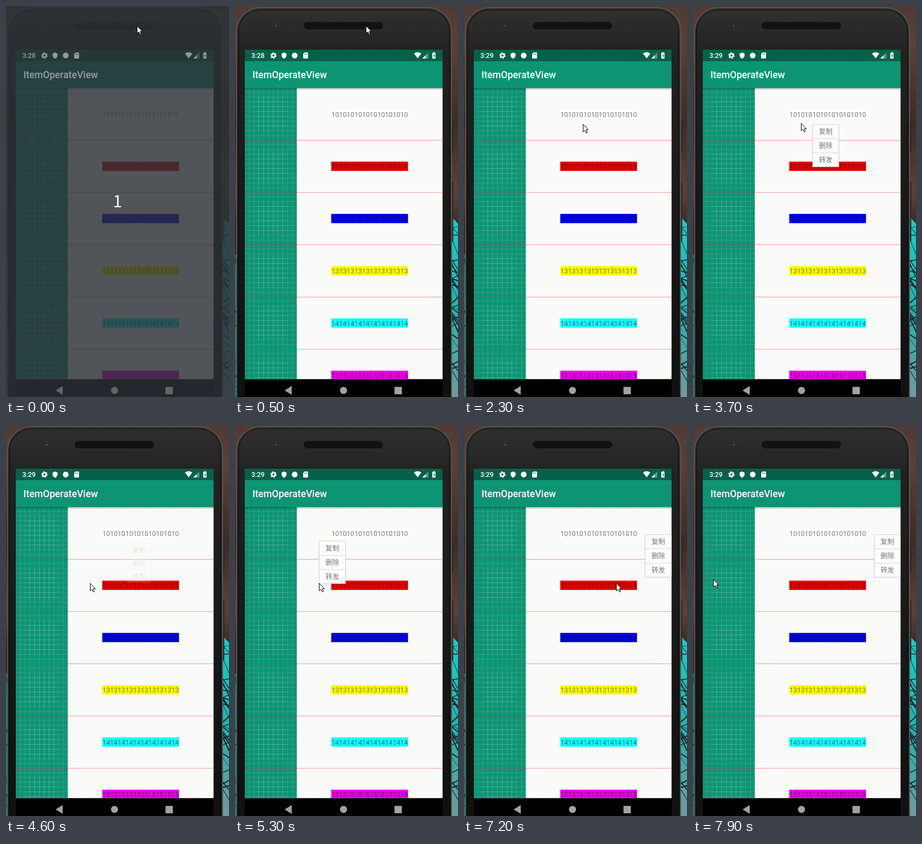
These frames come from a looping animation (409x715 px, 8000 ms). An HTML page:

```html
<!DOCTYPE html>
<html lang="en">
<head>
<meta charset="utf-8">
<title>ItemOperateView</title>
<style>
  html, body { margin: 0; width: 100%; height: 100%; overflow: hidden; background: #000; }
  svg { display: block; width: 100%; height: 100%; }
  text { font-family: Roboto, sans-serif; }
  .cjk { font-family: "Noto Sans CJK SC", "Noto Sans CJK", sans-serif; }
  .mid { text-anchor: middle; }
</style>
</head>
<body>
<svg viewBox="0 0 409 715">
  <defs>
    <linearGradient id="wall" x2="0" y2="1">
      <stop offset="0" stop-color="#4f3a34"/>
      <stop offset=".1" stop-color="#5a4037"/>
      <stop offset=".3" stop-color="#3f2b26"/>
      <stop offset=".48" stop-color="#5c4138"/>
      <stop offset=".56" stop-color="#3a2823"/>
    </linearGradient>
    <linearGradient id="neon" x2="0" y2="1">
      <stop offset="0" stop-color="#17cfc6"/>
      <stop offset=".5" stop-color="#1fb5b0"/>
      <stop offset="1" stop-color="#6f9a9c"/>
    </linearGradient>
    <linearGradient id="face" x2="0" y2="1">
      <stop offset="0" stop-color="#30302e"/>
      <stop offset=".11" stop-color="#222220"/>
      <stop offset=".5" stop-color="#191918"/>
      <stop offset="1" stop-color="#0f0f0f"/>
    </linearGradient>
    <linearGradient id="barShadow" x2="0" y2="1">
      <stop offset="0" stop-opacity=".3"/>
      <stop offset="1" stop-opacity="0"/>
    </linearGradient>
    <pattern id="mesh" width="3" height="3" patternUnits="userSpaceOnUse">
      <rect width="3" height="3" fill="#0c0c0c"/>
      <circle cx="1.5" cy="1.5" r=".8" fill="#292927"/>
    </pattern>
    <clipPath id="screen"><rect x="18" y="80" width="362.700" height="602.600"/></clipPath>
    <g id="grid" fill="none" stroke="#fff" stroke-opacity=".2" stroke-width=".8"></g>
  </defs>

  <!-- Wallpaper -->
  <rect width="409" height="715" fill="url(#wall)"/>
  <path d="M395 383L409 398V715H395Z" fill="url(#neon)"/>
  <path d="M0 455H6V715H0Z" fill="#14807c"/>
  <g id="wires" fill="none" stroke="#0b2a2c"></g>

  <!-- Phone -->
  <path d="M398 212h2v55h-2zM398 322h2v108h-2z" fill="#3b3b3a" stroke="#111" stroke-width=".6"/>
  <rect x="3" y="3" width="394" height="780" rx="43" fill="url(#face)" stroke="#565653" stroke-width="2"/>
  <rect x="6.500" y="7" width="387" height="780" rx="39.500" fill="none" stroke="#111" stroke-width="1.500" opacity=".7"/>
  <rect x="126.500" y="30" width="144.500" height="12" rx="6" fill="url(#mesh)" stroke="#0a0a0a"/>
  <circle cx="75" cy="36" r="5.500" fill="#24262a" stroke="#3a3a39"/>
  <circle cx="75" cy="36" r="2.500" fill="#3a4352"/>

  <!-- Screen -->
  <g clip-path="url(#screen)">
    <rect x="18" y="150" width="363" height="533" fill="#fafaf8"/>
    <rect x="18" y="150" width="95.360" height="533" fill="#0d9473"/>
    <g id="rows"></g>
    <rect x="18" y="80" width="363" height="21" fill="#07614a"/>
    <rect x="18" y="101" width="363" height="49" fill="#0d9473"/>
    <rect x="18" y="150" width="363" height="4" fill="url(#barShadow)"/>
  </g>
  <rect x="18" y="682.600" width="363" height="33"/>

  <g id="dim">
    <rect width="409" height="715" fill="#2d3035" opacity=".82"/>
    <text class="cjk mid" x="204.500" y="368" font-size="30" fill="#fff">1</text>
  </g>

  <g id="labels" fill="#fff">
    <text id="clock" x="30" y="95" font-size="12.400" font-weight="500"></text>
    <text x="32" y="132" font-size="17.660" font-weight="500">ItemOperateView</text>
    <circle cx="70.500" cy="90.500" r="3.200" fill="none" stroke="#fff" stroke-width="2.600"/>
    <circle cx="70.500" cy="90.500" r="4.900" fill="none" stroke="#fff" stroke-width="1.800" stroke-dasharray="2.600 2.530"/>
    <path d="M90 85l4.500 2v3.200q0 4-4.500 6.300q-4.500-2.300-4.500-6.300V87Z"/>
    <circle cx="109.500" cy="90.500" r="5.200"/>
    <path d="M127.500 85h5.500q1 0 1 1v9q0 1-1 1h-7q-1 0-1-1v-7.500Z"/>
    <path d="M127.800 87v2M129.800 87v2M131.800 87v2" stroke="#07614a"/>
    <path d="M328.300 87q6.700-4.800 13.400 0L335 95.800Z"/>
    <path d="M354.500 85v11h-11Z" opacity=".35"/>
    <path d="M349.500 90v6h-6Z"/>
    <path d="M363 85.500h1v-1h2.500v1h1.200v10.800h-5.900V85.500Z"/>
    <path d="M365.500 87.500l-2 3.800h1.400v3l2-3.900h-1.400Z" fill="#07614a"/>
    <g fill="#a2a2a2">
      <path d="M91 703l13-8v16Z"/>
      <circle cx="199" cy="703" r="6.500"/>
      <rect x="292.500" y="696.500" width="13.500" height="13.500" rx="1"/>
    </g>
  </g>

  <g id="menu">
    <rect x="-1" y="1" width="51" height="79" rx="1" opacity=".05"/>
    <rect x=".5" y=".5" width="48" height="77.500" fill="#fdfdfd" stroke="#d9d9d9"/>
    <path d="M0 26.500H49M0 52.500H49" stroke="#d9d9d9"/>
    <g class="mid" font-size="12.400" fill="#757575">
      <text class="cjk" x="24.500" y="18">复制</text>
      <text class="cjk" x="24.500" y="44">删除</text>
      <text class="cjk" x="24.500" y="70">转发</text>
    </g>
  </g>

  <path id="cursor" d="M.5 .5V14.200L3.700 11.300L6 16.300L8.200 15.300L6 10.400H10Z" fill="#fff" stroke="#000" stroke-linejoin="round"/>
</svg>
<script>
const $ = id => document.getElementById(id);
const LOOP = 8000, STEP = 100, ROW_TOP = 149.7, ROW_HEIGHT = 95.55;

// Launcher-style grid on a 108 unit square, with a denser inner square
function buildGrid() {
  let d = "";
  for (let p = 9; p <= 99; p += 10) d += `M${p} 0V108M0 ${p}H108`;
  for (let p = 29; p <= 79; p += 10) d += `M${p} 19V89M19 ${p}H89`;
  $("grid").innerHTML = d.split(/(?=M)/).map(line => `<path d="${line}"/>`).join("");
}

function buildRows() {
  const fills = ["#fff", "#e00000", "#0000e6", "#ff0", "#1ff", "#e800e8"];
  $("rows").innerHTML = fills.map((fill, i) => {
    const top = ROW_TOP + i * ROW_HEIGHT, mid = top + ROW_HEIGHT / 2;
    return `<use href="#grid" transform="translate(18 ${top}) scale(.883)"/>
      <rect x="176.500" y="${mid - 8.4}" width="140.800" height="17" fill="${fill}"/>
      <text class="mid" x="247" y="${mid + 5.2}" font-size="12.500" fill-opacity=".52">${String(10 + i).repeat(10)}</text>
      <path d="M18 ${top + ROW_HEIGHT + .3}H381" stroke="#d2304c" stroke-opacity=".48"/>`;
  }).join("");
}

function buildWires() {
  let seed = 7;
  const rand = () => (seed = seed * 16807 % 2147483647) / 2147483647;
  let out = "";
  for (let i = 0; i < 44; i++) {
    const left = i % 4 === 0, x = left ? 0 : 397, y = (left ? 460 : 402) + rand() * 290;
    out += `<path d="M${x} ${y}l${left ? 5 : 13} ${rand() * 44 - 12}" stroke-width="${.6 + rand() * 1.8}"/>`;
  }
  $("wires").innerHTML = out;
}

// Pointer path: time, x, y
const pointerPath = [
  [0, 240, 36], [800, 240, 36], [1300, 246, 86], [1400, 246, 86], [1900, 218, 216],
  [3300, 218, 216], [3500, 204, 220], [3600, 204, 220], [3700, 198, 214], [4000, 174, 180],
  [4400, 154, 289], [5600, 154, 289], [5900, 238, 318], [6200, 337, 277], [6500, 337, 277],
  [6700, 328, 285], [6800, 328, 285], [6900, 324, 286], [7100, 324, 286], [7400, 190, 296],
  [7700, 50, 291], [7800, 50, 291], [7900, 37, 282], [8000, 37, 282]
];

const menus = [
  { x: 219, y: 216, show: 3000, full: 3000, hide: 4600 },
  { x: 154, y: 212, show: 5200, full: 5300, hide: 6400 },
  { x: 332, y: 200, show: 6900, full: 7000, hide: LOOP }
];

function pointerAt(t) {
  const i = pointerPath.findIndex(p => p[0] > t);
  const [t0, x0, y0] = pointerPath[i - 1], [t1, x1, y1] = pointerPath[i];
  const k = (t - t0) / (t1 - t0);
  return [x0 + (x1 - x0) * k, y0 + (y1 - y0) * k].map(Math.round);
}

function drawMenu(t) {
  const menu = menus.find(m => t >= m.show && t < m.hide + STEP);
  $("menu").style.display = menu ? "" : "none";
  if (!menu) return;
  const leaving = t >= menu.hide;
  const shrink = leaving ? " translate(24.5 0) scale(.923) translate(-24.5 0)" : "";
  $("menu").setAttribute("transform", `translate(${menu.x} ${menu.y})${shrink}`);
  $("menu").setAttribute("opacity", leaving ? .16 : t < menu.full ? .5 : 1);
}

function draw() {
  const t = Math.floor(performance.now() % LOOP / STEP) * STEP;
  const dimmed = t < 500;
  $("dim").style.display = dimmed ? "" : "none";
  $("labels").setAttribute("opacity", dimmed ? .5 : 1);
  $("clock").textContent = t < 1100 ? "3:28" : "3:29";
  $("cursor").setAttribute("transform", `translate(${pointerAt(t)})`);
  drawMenu(t);
  requestAnimationFrame(draw);
}

buildGrid();
buildRows();
buildWires();
draw();
</script>
</body>
</html>
```
